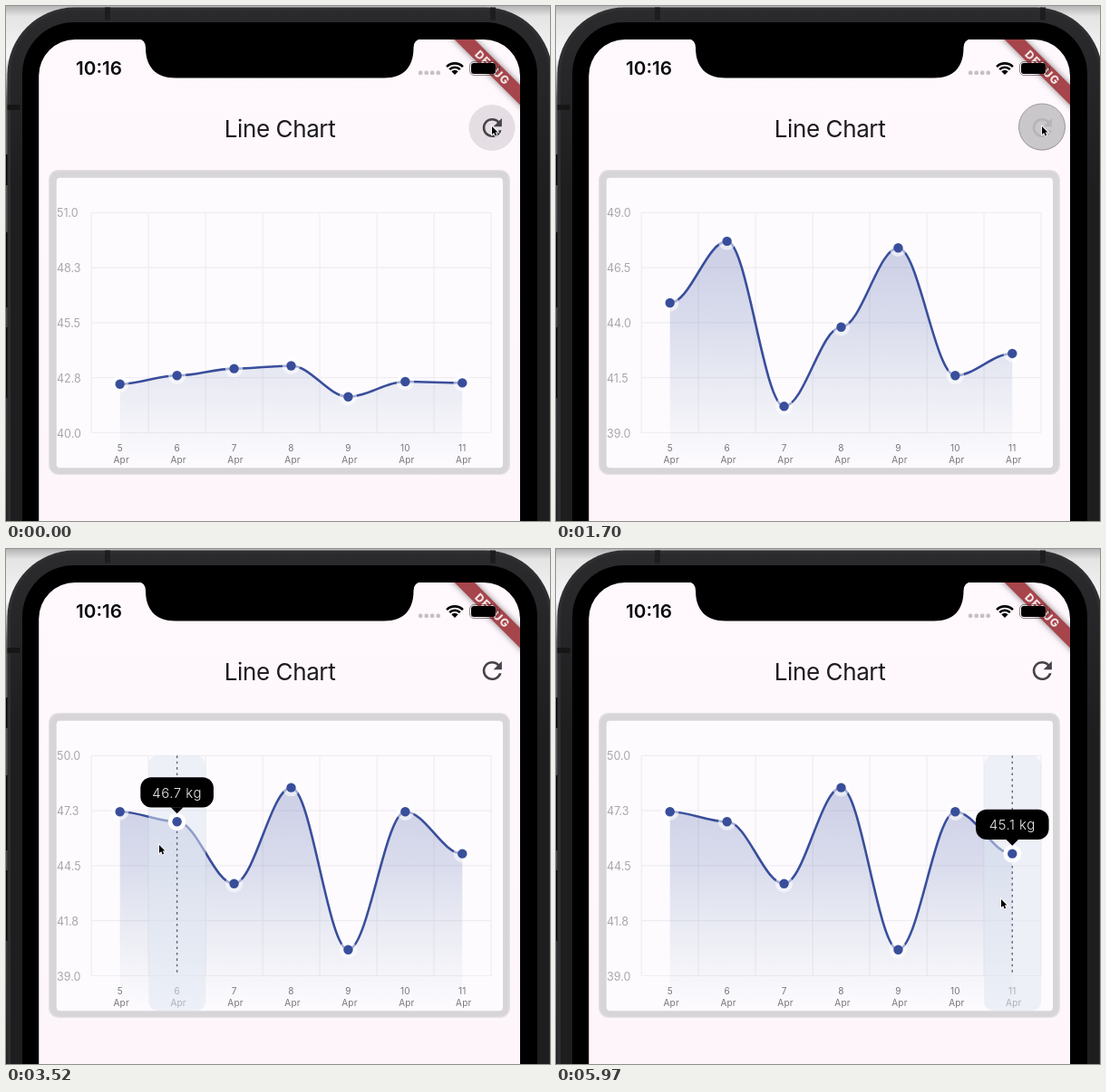
Animation, 600 px wide and 569 px high, one loop 6 s. Source, as an HTML page with a canvas:

```html
<!DOCTYPE html>
<html lang="en">
<head>
<meta charset="utf-8">
<title>Line Chart</title>
<style>
  html, body { margin: 0; width: 100%; height: 100%; overflow: hidden; background: #000; }
  canvas { display: block; width: 600px; height: 569px; }
</style>
</head>
<body>
<canvas id="stage" width="600" height="569"></canvas>
<script>
const c = document.getElementById('stage').getContext('2d');
const LOOP = 6000, GROW = 500;
const TOP = 228.3, BASE = 471.5, FLOOR = 510;
const STEP = 62.93, SMOOTH = 0.35;
const INK = '#394e9b';

const charts = [
  { start: -148, min: 40, max: 51, data: [44.9, 47, 48.7, 49.4, 41.8, 45.5, 45.2] },
  { start: 825, min: 39, max: 49, data: [44.9, 47.7, 40.2, 43.8, 47.4, 41.6, 42.6] },
  { start: 1784, min: 39, max: 50, data: [47.2, 46.7, 43.6, 48.4, 40.3, 47.2, 45.1] }
];
const refreshPresses = [[690, 830], [1640, 1790]];
// One tap per day, from left to right
const taps = [[2640, 2760], [3280, 3400], [3960, 4080], [4640, 4780], [5060, 5160], [5380, 5480], [5720, 5820]];
// Pointer path: time, x, y
const path = [
  [2200, 536, 133], [2480, 113, 336], [2640, 120, 338], [2900, 120, 338], [3180, 169, 327],
  [3600, 169, 327], [3900, 240, 372], [4150, 243, 375], [4600, 307, 396], [4640, 318, 399],
  [4760, 350, 408], [4950, 372, 408], [5160, 375, 407], [5320, 432, 396], [5480, 434, 395],
  [5680, 491, 387]
];

const refreshIcon = new Path2D('M17.65 6.35C16.2 4.9 14.21 4 12 4c-4.42 0-7.99 3.58-7.99 8s3.57 8 7.99 8c3.73 0 6.84-2.55 7.73-6h-2.08c-.82 2.33-3.04 4-5.65 4-3.31 0-6-2.69-6-6s2.69-6 6-6c1.66 0 3.14.69 4.22 1.78L13 11h7V4l-2.35 2.35z');
const arrow = new Path2D('M0 0V9L2.2 7.1L3.6 10.4L5.2 9.7L3.8 6.5H6.5Z');

const clamp = v => Math.max(0, Math.min(1, v));
const ease = u => 0.5 - 0.5 * Math.cos(Math.PI * clamp(u));
const dayX = i => 125.7 + STEP * i;
const gridX = i => 94.2 + 62.98 * i;
const within = (t, spans) => spans.some(([a, b]) => t >= a && t < b);

function box(x, y, w, h, r, fill) {
  c.beginPath();
  c.roundRect(x, y, w, h, r);
  c.fillStyle = fill;
  c.fill();
}

function disc(x, y, r, fill) {
  c.beginPath();
  c.arc(x, y, r, 0, 7);
  c.fillStyle = fill;
  c.fill();
}

function text(str, x, y, size, color, { weight = 400, align = 'center', spacing = 0 } = {}) {
  c.font = `${weight} ${size}px Inter, "Open Sans", sans-serif`;
  c.textAlign = align;
  c.letterSpacing = spacing + 'px';
  c.fillStyle = color;
  c.fillText(str, x, y);
}

function vertical(y0, y1, ...stops) {
  const g = c.createLinearGradient(0, y0, 0, y1);
  stops.forEach(([at, color]) => g.addColorStop(at, color));
  return g;
}

function pointer(t) {
  if (t <= path[0][0]) return path[0].slice(1);
  const i = path.findIndex(k => k[0] > t);
  if (i < 0) return path[path.length - 1].slice(1);
  const [t0, x0, y0] = path[i - 1], [t1, x1, y1] = path[i];
  const u = (t - t0) / (t1 - t0);
  return [x0 + (x1 - x0) * u, y0 + (y1 - y0) * u];
}

function drawPhone() {
  c.fillStyle = vertical(0, 569, [0, '#b4b4b4'], [0.02, '#e4e4e4'], [0.1, '#f6f6f6'], [0.18, '#666'], [1, '#222']);
  c.fillRect(0, 0, 600, 569);
  for (const [y, h] of [[164, 34], [250, 83], [355, 78]]) box(-2, y, 5, h, 1, '#080808');
  box(1.5, 1.5, 601, 700, 74, '#2f2e31');
  box(5, 5, 594, 700, 70, vertical(0, 200, [0, '#2b2a2d'], [1, '#1f1e1f']));
  for (const x of [109, 534]) box(x, 1.5, 6, 14, 0, '#1d1c1e');
  box(1.5, 109, 14, 6, 0, '#171617');
  box(18, 18, 568, 700, 57, '#000');
}

function drawBanner() {
  c.save();
  c.translate(567, 37);
  c.rotate(Math.PI / 4);
  c.shadowColor = 'rgba(0,0,0,.5)';
  c.shadowBlur = 7;
  c.fillStyle = '#a6454b';
  c.fillRect(-60, 35.5, 120, 15.6);
  c.shadowBlur = 0;
  text('DEBUG', 0.5, 48, 12.5, '#f3e4e6', { weight: 800, spacing: 1 });
  c.restore();
}

function drawStatus() {
  c.fillStyle = '#000';
  c.beginPath();
  c.moveTo(145, 36);
  c.quadraticCurveTo(154, 37, 154, 46);
  c.bezierCurveTo(154, 67, 165, 79.5, 187, 79.5);
  c.lineTo(417, 79.5);
  c.bezierCurveTo(439, 79.5, 449.5, 67, 449.5, 46);
  c.quadraticCurveTo(449.5, 37, 459, 36);
  c.fill();

  text('10:16', 102.5, 76.4, 20.7, '#0a0a0b', { weight: 600 });
  for (let i = 0; i < 4; i++) box(455 + i * 6.5, 71.5, 4.4, 4.6, 1.5, '#c5c0c5');

  c.strokeStyle = '#000';
  for (const [r, w] of [[12.6, 2.6], [8.2, 2.6], [2.6, 5.2]]) {
    c.lineWidth = w;
    c.beginPath();
    c.arc(495, 76, r, -Math.PI * 0.75, -Math.PI * 0.25);
    c.stroke();
  }

  c.lineWidth = 1;
  c.strokeStyle = 'rgba(60,40,45,.55)';
  c.beginPath();
  c.roundRect(511.5, 61.5, 30, 15, 4.5);
  c.stroke();
  box(513, 63, 27, 12, 3, '#000');
  box(543, 66.5, 1.8, 5, 1, 'rgba(50,35,40,.6)');
}

function drawScreen(ripple) {
  c.save();
  c.beginPath();
  c.roundRect(36.2, 37, 530.8, 700, 40);
  c.clip();
  c.fillStyle = vertical(37, 569, [0, '#fff8fd'], [1, '#fdf5fa']);
  c.fillRect(36, 37, 531, 540);
  drawBanner();
  c.restore();
  drawStatus();

  text('Line Chart', 302, 144.5, 26, '#1d1b1f', { spacing: -0.4 });
  if (ripple > 0) disc(536, 134.5, 25.5, `rgba(70,66,76,${0.14 * ripple})`);
  c.save();
  c.translate(536.3 - 12 * 1.32, 134.5 - 12 * 1.32);
  c.scale(1.32, 1.32);
  c.fillStyle = '#454249';
  c.fill(refreshIcon);
  c.restore();

  box(47, 181, 509, 337, 11, '#e2e0e3');
  box(48.3, 182.3, 506.4, 334.4, 10, '#d7d5d8');
  box(55.7, 189.7, 492.3, 320.6, 4, '#fdfbfe');
}

function drawGrid({ min, max }) {
  c.strokeStyle = '#efedf1';
  c.lineWidth = 1.2;
  c.beginPath();
  for (let i = 0; i < 8; i++) {
    c.moveTo(gridX(i), TOP);
    c.lineTo(gridX(i), BASE);
  }
  for (let i = 0; i < 5; i++) {
    const y = TOP + (BASE - TOP) * i / 4;
    c.moveTo(gridX(0), y);
    c.lineTo(gridX(7), y);
    text((max - (max - min) * i / 4).toFixed(1), 56, y + 5, 12.5, '#a9a7ac', { align: 'left' });
  }
  c.stroke();
  for (let i = 0; i < 7; i++) {
    text(5 + i, dayX(i), 492.3, 10, '#78767b', { spacing: 0.2 });
    text('Apr', dayX(i) + 1.5, 505, 10, '#78767b', { spacing: 0.2 });
  }
}

function drawCurve(ys) {
  const pull = STEP * SMOOTH;
  const trace = () => {
    c.beginPath();
    c.moveTo(dayX(0), ys[0]);
    for (let i = 1; i < 7; i++)
      c.bezierCurveTo(dayX(i - 1) + pull, ys[i - 1], dayX(i) - pull, ys[i], dayX(i), ys[i]);
  };
  trace();
  c.lineTo(dayX(6), FLOOR);
  c.lineTo(dayX(0), FLOOR);
  c.fillStyle = vertical(TOP, FLOOR, [0, 'rgba(57,74,155,.28)'], [0.43, 'rgba(57,80,158,.18)'], [0.86, 'rgba(70,105,150,.045)'], [1, 'rgba(70,105,150,0)']);
  c.fill();
  trace();
  c.strokeStyle = INK;
  c.lineWidth = 2.6;
  c.stroke();
  ys.forEach((y, i) => {
    disc(dayX(i), y, 9.7, 'rgba(255,255,255,.55)');
    disc(dayX(i), y, 5.2, INK);
  });
}

function drawSelection(i, y, value) {
  const x = dayX(i);
  box(gridX(i), TOP, 62.98, 282, 10, 'rgba(222,230,242,.52)');
  c.strokeStyle = '#66656b';
  c.lineWidth = 1.4;
  c.setLineDash([2.6, 3.8]);
  c.beginPath();
  c.moveTo(x, TOP);
  c.lineTo(x, BASE);
  c.stroke();
  c.setLineDash([]);
  disc(x, y, 9.9, '#fff');
  disc(x, y, 5.2, INK);

  box(x - 40.3, y - 49, 80.6, 33.3, 12, '#000');
  c.beginPath();
  c.moveTo(x - 7, y - 16);
  c.lineTo(x, y - 9);
  c.lineTo(x + 7, y - 16);
  c.fill();
  text(value.toFixed(1) + ' kg', x, y - 26.3, 15, '#ececec', { weight: 300, spacing: 0.5 });
}

function drawPointer(t) {
  if (within(t, refreshPresses) || within(t, taps)) {
    const [x, y] = pointer(t - 75);
    disc(x, y + 0.5, 25.5, 'rgba(198,196,200,.88)');
    c.strokeStyle = '#929195';
    c.lineWidth = 0.9;
    c.stroke();
  }
  const [x, y] = pointer(t);
  c.save();
  c.translate(x, y);
  c.strokeStyle = '#fff';
  c.lineWidth = 1.6;
  c.stroke(arrow);
  c.fillStyle = '#000';
  c.fill(arrow);
  c.restore();
}

function draw(t) {
  const chart = charts.filter(k => t >= k.start).pop();
  const age = t - chart.start;
  const grown = ease(age / GROW);
  const low = Math.min(...chart.data);
  const ys = chart.data.map(v =>
    BASE - (low + (v - low) * grown - chart.min) / (chart.max - chart.min) * (BASE - TOP));
  const ripple = within(t, refreshPresses) ? 1 : clamp((340 - age) / 190);

  drawPhone();
  drawScreen(ripple);
  drawGrid(chart);
  drawCurve(ys);
  const day = taps.filter(([down]) => t >= down + 30).length - 1;
  if (day >= 0) drawSelection(day, ys[day], chart.data[day]);
  drawPointer(t);
}

const begin = performance.now();
function tick() {
  draw((performance.now() - begin) % LOOP);
  requestAnimationFrame(tick);
}
tick();
</script>
</body>
</html>
```
